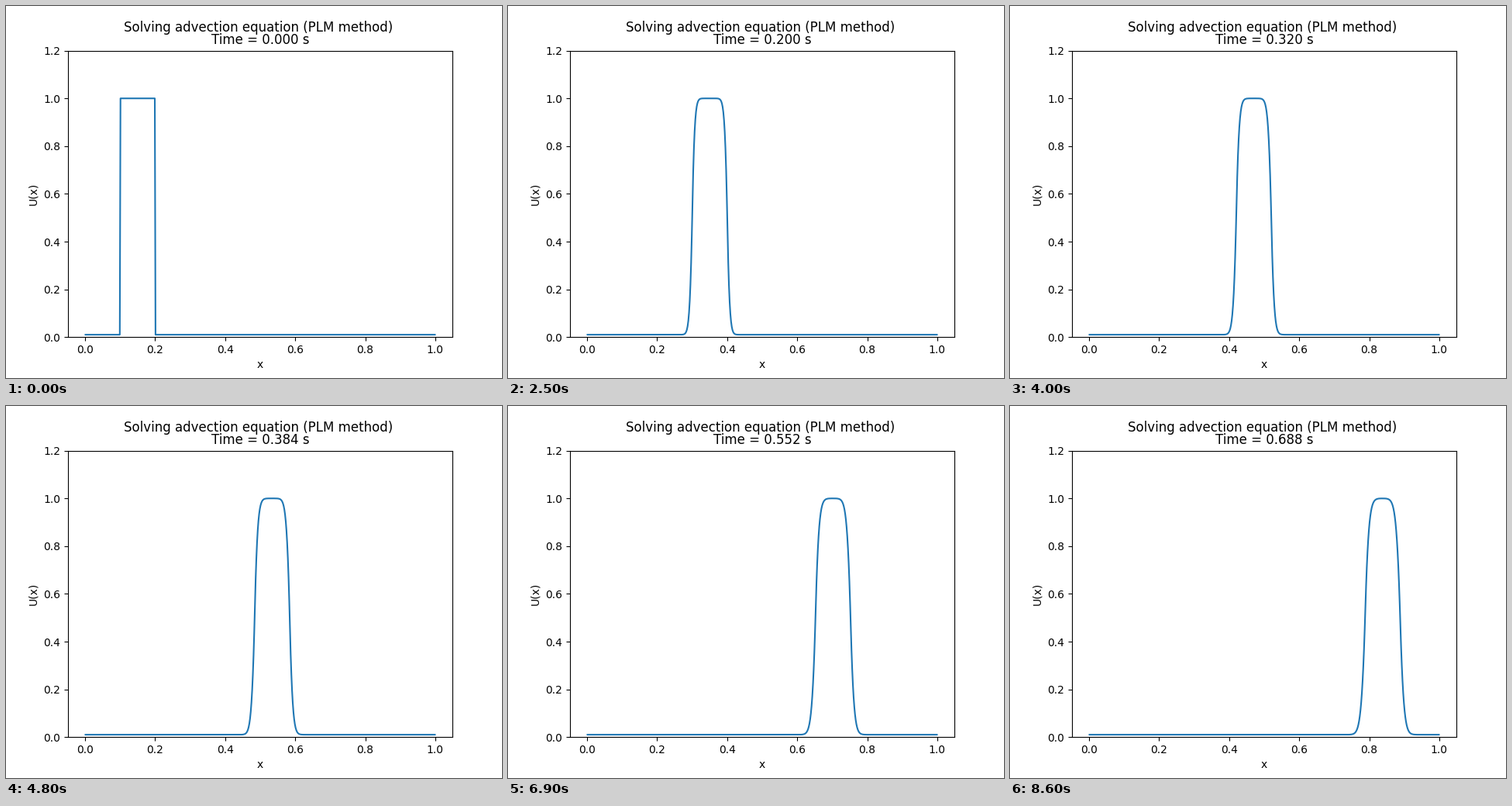
Recreate the animation shown at these times as a matplotlib script. Size 640 by 480 pixels, loop 8700 ms.

```python
import numpy as np
import matplotlib.pyplot as plt
from matplotlib.animation import FuncAnimation

CELLS = 500
COURANT = 0.4
STEPS = 10       # solver steps per frame
FRAMES = 87

dx = 1 / CELLS
dt = COURANT * dx
x = (np.arange(CELLS) + 0.5) * dx


def minmod(a, b):
    return np.where(a * b > 0, np.sign(a) * np.minimum(abs(a), abs(b)), 0)


def advance(u):
    """One piecewise linear (PLM) step with unit speed, periodic domain."""
    slope = minmod(u - np.roll(u, 1), np.roll(u, -1) - u)
    flux = u + 0.5 * (1 - COURANT) * slope
    return u - COURANT * (flux - np.roll(flux, 1))


def solve():
    u = np.where((x > 0.1) & (x < 0.2), 1.0, 0.01)
    states = [u]
    for _ in range(FRAMES - 1):
        for _ in range(STEPS):
            u = advance(u)
        states.append(u)
    return states


states = solve()

fig, ax = plt.subplots(figsize=(6.4, 4.8), dpi=100)
line, = ax.plot(x, states[0])
ax.set_ylim(0, 1.2)
ax.set_xlabel("x")
ax.set_ylabel("U(x)")


def draw(i):
    line.set_ydata(states[i])
    time = i * STEPS * dt
    ax.set_title(f"Solving advection equation (PLM method) \nTime = {time:.3f} s",
                 linespacing=0.9)
    return line,


anim = FuncAnimation(fig, draw, frames=FRAMES, interval=100,
                     repeat=True, repeat_delay=0)
plt.show()
```
